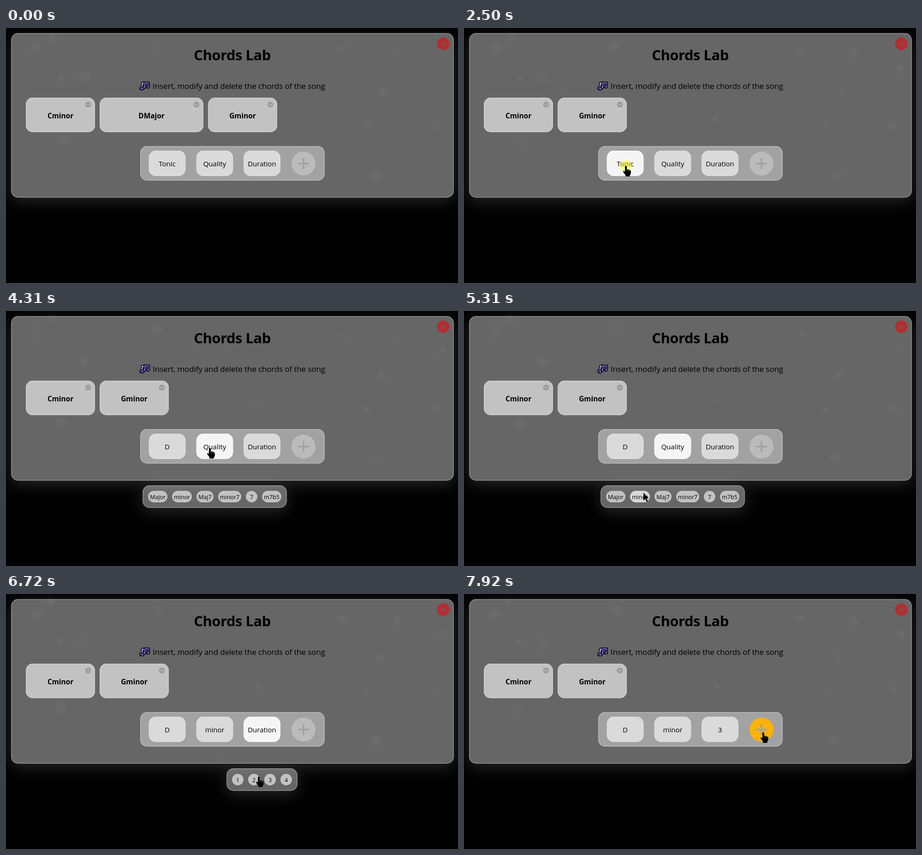
Recreate the animation shown at these times as an HTML page with a canvas. Size 980 by 553 pixels, loop 8000 ms.

```html
<!DOCTYPE html>
<html lang="en">
<head>
<meta charset="utf-8">
<title>Chords Lab</title>
<style>
html, body { margin: 0; height: 100%; overflow: hidden; background: #000; }
canvas { display: block; }
</style>
</head>
<body>
<canvas id="stage" width="980" height="553"></canvas>
<script>
const ctx = document.getElementById('stage').getContext('2d');
const LOOP = 8000, START = 280, STEP = 100.5;
const FONT = '"Open Sans", "Noto Sans", sans-serif';
const TONICS = ['C', 'G', 'D', 'A', 'E', 'B', 'F#', 'C#', 'G#', 'D#', 'A#', 'F'];
const QUALITIES = [['Major', 42], ['minor', 43], ['Maj7', 37], ['minor7', 50], ['7', 25], ['m7b5', 42]];

// Pointer path: time, x, y
const PATH = [
  [280, 520, 462], [590, 452, 270], [890, 415, 176], [990, 413, 171], [1850, 413, 171],
  [2090, 376, 250], [2290, 351, 299], [2750, 351, 299], [3000, 362, 350], [3200, 382, 404],
  [3295, 400, 424], [3390, 401, 428], [3690, 400, 428], [3890, 425, 365], [4090, 442, 297],
  [4310, 442, 297], [4500, 448, 335], [4800, 464, 418], [4900, 420, 419], [5100, 376, 415],
  [5200, 378, 417], [5300, 389, 394], [5600, 387, 402], [5900, 555, 313], [6110, 555, 313],
  [6410, 554, 361], [6590, 553, 363], [6710, 548, 396], [7010, 578, 404], [7310, 578, 404],
  [7500, 620, 340], [7710, 649, 300], [8000, 649, 300]
];
const HAND = [[890, 1385], [2180, 2890], [3190, 3690], [4000, 4400], [5400, 5600],
  [5880, 6200], [6700, 7310], [7600, 8000]];
const CLICKS = [1080, 2490, 3590, 4195, 5500, 6005, 7210];

const clamp = v => Math.max(0, Math.min(1, v));
const during = (t, from, to) => t >= from && t < to;
const fade = (t, on, off) => clamp((t - on) / 200) - clamp((t - off) / 200);
const gray = v => `rgb(${v},${v},${v})`;

function text(str, x, y, size, weight = 400, spacing = 0) {
  ctx.font = `${weight} ${size}px ${FONT}`;
  ctx.letterSpacing = spacing + 'px';
  ctx.textAlign = 'center';
  ctx.fillStyle = '#000';
  ctx.fillText(str, x, y);
}

function box(x, y, w, h, r, fill, border) {
  ctx.beginPath();
  ctx.roundRect(x, y, w, h, r);
  ctx.fillStyle = fill;
  ctx.fill();
  if (!border) return;
  ctx.beginPath();
  ctx.roundRect(x + 1, y + 1, w - 2, h - 2, r - 1);
  ctx.strokeStyle = border;
  ctx.lineWidth = 2;
  ctx.stroke();
}

function disc(x, y, r, fill) {
  ctx.beginPath();
  ctx.arc(x, y, r, 0, 7);
  ctx.fillStyle = fill;
  ctx.fill();
}

function lines(color, width, ...segments) {
  ctx.strokeStyle = color;
  ctx.lineWidth = width;
  ctx.beginPath();
  for (const [x1, y1, x2, y2] of segments) {
    ctx.moveTo(x1, y1);
    ctx.lineTo(x2, y2);
  }
  ctx.stroke();
}

// Translucent panel with a soft glow outside its edge
function glass(x, y, w, h) {
  ctx.save();
  ctx.beginPath();
  ctx.rect(0, 0, 980, 553);
  ctx.roundRect(x, y, w, h, 15);
  ctx.clip('evenodd');
  ctx.shadowColor = 'rgba(200,205,200,.18)';
  ctx.shadowBlur = 32;
  ctx.shadowOffsetY = 8;
  box(x, y, w, h, 15, '#000');
  ctx.restore();
  box(x, y, w, h, 15, 'rgba(255,255,255,.4)', 'rgba(255,255,255,.18)');
}

function blobs(t) {
  const spots = [[67, 42, 18], [98, 18, 14], [122, 246, 18], [172, 106, 17], [330, 38, 17],
    [545, 200, 10], [728, 48, 14], [802, 317, 17], [815, 142, 14], [786, 210, 12],
    [932, 208, 14], [945, 90, 13], [845, 55, 12], [118, 104, 10]];
  spots.forEach(([x, y, r], i) => {
    const dx = x + 3 * Math.sin(t / 2500 + i), dy = y + 4 * Math.sin(t / 3000 + i * 2);
    const glow = ctx.createRadialGradient(dx, dy, 0, dx, dy, r);
    glow.addColorStop(0, `rgba(255,255,255,${.035 + .015 * Math.sin(t / 900 + i)})`);
    glow.addColorStop(1, 'rgba(255,255,255,0)');
    disc(dx, dy, r, glow);
  });
}

function notes() {
  ctx.lineJoin = 'round';
  ctx.strokeStyle = '#000';
  ctx.lineWidth = 1.6;
  for (const [path, fill] of [
    ['M294 118l6-1v5l-3 1v6a4 3.6 0 1 1-4-2z', '#b9a8e8'],
    ['M293 129a3.5 3.3 0 1 0 6 2a3.5 3.3 0 0 0-6-2z', '#7b62c8'],
    ['M299 117l12 0v11a3 2.7 0 1 1-3-3v-4l-5 0v8a3 2.7 0 1 1-4-3z', '#7b62c8']
  ]) {
    const shape = new Path2D(path);
    ctx.fillStyle = fill;
    ctx.fill(shape);
    ctx.stroke(shape);
  }
}

function tile(x, w, name) {
  box(x, 151, w, 75, 15, '#c2c2c2', '#cbcbcb');
  text(name, x + w / 2, 196, 15.4, 700);
  const cx = x + w - 15;
  disc(cx, 166, 6.5, '#9d9d9d');
  lines('#c2c2c2', 1.5, [cx - 3.5, 166, cx + 3.5, 166]);
}

function button(cx, label, lit) {
  const v = Math.round(218 + 27 * lit);
  box(cx - 39.75, 266, 79.5, 55, 15, gray(v), gray(v + 3));
  text(label, cx, 300, 15);
}

function pill(cx, cy, w, label, lit = 0) {
  box(cx - w / 2, cy - 12.5, w, 25, 12.5, gray(Math.round(194 + 28 * lit)));
  text(label, cx, cy + 5.5, 12.5);
}

function plus(lit) {
  const mix = (a, b) => Math.round(a + (b - a) * lit);
  disc(645, 294, 26, `rgb(${mix(187, 253)},${mix(187, 178)},${mix(187, 10)})`);
  ctx.lineCap = 'round';
  lines('#a3a3a3', 4, [635, 294, 655, 294], [645, 284, 645, 304]);
  ctx.lineCap = 'butt';
}

function popups(t) {
  if (during(t, 2590, 3690)) {
    glass(267, 378, 165, 165);
    const lit = { G: fade(t, 3080, 3250), D: fade(t, 3200, 9000) };
    TONICS.forEach((name, i) => {
      const a = i * Math.PI / 6;
      pill(349.5 + 60 * Math.sin(a), 462.5 - 60 * Math.cos(a), 25, name, lit[name]);
    });
  }
  if (during(t, 4300, 5600)) {
    glass(296, 378, 313, 49);
    let x = 308;
    for (const [name, w] of QUALITIES) {
      pill(x + w / 2, 402.5, w, name, name === 'minor' ? fade(t, 5150, 9000) : 0);
      x += w + 10;
    }
  }
  if (during(t, 6105, 7310)) {
    glass(478, 378, 154, 49);
    for (let n = 1; n <= 4; n++) {
      const lit = n === 2 ? fade(t, 6700, 6850) : n === 3 ? fade(t, 6880, 9000) : 0;
      pill(467.5 + 35 * n, 402.5, 25, n, lit);
    }
  }
}

const arrowShape = new Path2D('M0 0V17L4 13.4L6.8 19.6L9.6 18.4L6.9 12.3H12z');
const handShape = new Path2D('M-2 1Q0-1 2 1V8Q4 6.5 5.3 8.5Q7 7.3 8 9.4Q10.5 8.6 10.8 11.5' +
  'V16Q10.5 19 8.5 20V23H-1V20L-5.6 13.5Q-6.5 10.5-4 11L-2 13z');

function pointer(t) {
  if (t < START) return;
  const i = Math.max(1, PATH.findIndex(p => p[0] > t));
  const [t0, x0, y0] = PATH[i - 1], [t1, x1, y1] = PATH[i];
  const k = clamp((t - t0) / (t1 - t0));
  const x = Math.round(x0 + (x1 - x0) * k), y = Math.round(y0 + (y1 - y0) * k);
  if (CLICKS.some(c => during(t, c, c + 95))) disc(x, y, 12, 'rgba(255,255,0,.5)');
  const hand = HAND.some(([from, to]) => during(t, from, to));
  const shape = hand ? handShape : arrowShape;
  ctx.save();
  ctx.translate(x, y);
  ctx.strokeStyle = 'rgba(255,255,255,.45)';
  ctx.lineWidth = 1;
  ctx.stroke(shape);
  ctx.fillStyle = '#000';
  ctx.fill(shape);
  if (hand) lines('#aaa', .7, [2.2, 8, 2.2, 11.5], [5.3, 9, 5.3, 12], [8, 10, 8, 12.5]);
  ctx.restore();
}

function draw(t) {
  ctx.fillStyle = '#000';
  ctx.fillRect(0, 0, 980, 553);
  glass(11, 11, 960, 357);
  blobs(t);

  disc(948, 34, 13.5, '#b42d30');
  lines('#745b5c', 1.7, [943.5, 29.5, 952.5, 38.5], [952.5, 29.5, 943.5, 38.5]);
  text('Chords Lab', 490.5, 70, 31, 700, -.5);
  notes();
  text('Insert, modify and delete the chords of the song', 505, 132, 17, 400, -.13);

  const deleted = t >= 1385;
  tile(43, 150, 'Cminor');
  if (!deleted) tile(203, 225, 'DMajor');
  tile(deleted ? 203 : 438, 150, 'Gminor');

  box(291, 256, 400, 75, 15, '#a2a2a2', '#b2b2b2');
  button(349.5, t < 3690 ? 'Tonic' : 'D', fade(t, 2150, 3690));
  button(452.5, t < 5600 ? 'Quality' : 'minor', fade(t, 3990, 5600));
  button(555, t < 7310 ? 'Duration' : '3', fade(t, 5860, 7310));
  plus(fade(t, 7580, 9000));
  popups(t);
  pointer(t);
}

function frame(now) {
  const t = now % LOOP;
  draw(t < START ? 0 : START + Math.floor((t - START) / STEP) * STEP);
  requestAnimationFrame(frame);
}
requestAnimationFrame(frame);
</script>
</body>
</html>
```
